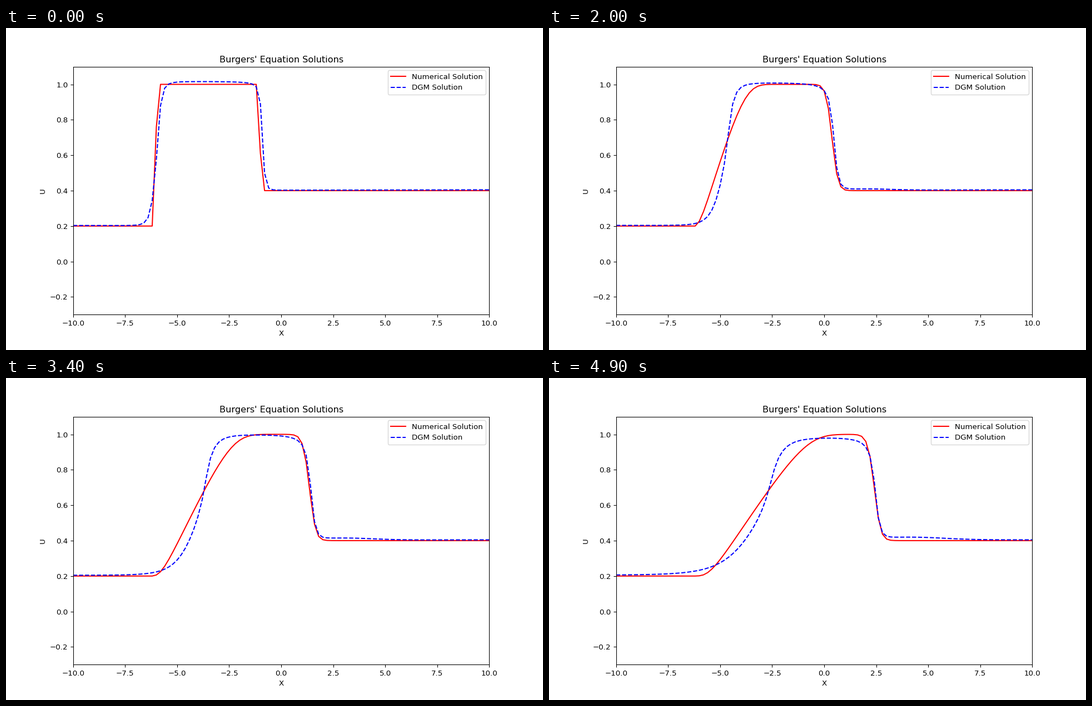
Write a matplotlib script that moves like this. It is 966 px wide and 580 px high and loops after 5 s.

```python
import numpy as np
import matplotlib.pyplot as plt
from matplotlib.animation import FuncAnimation

FRAMES, INTERVAL = 50, 100
DX, DT = 0.2, 0.1
DPI = 96.6
x = np.linspace(-10, 10, 101)


def upwind_history():
    """First-order conservative upwind solution, one row per time step."""
    u = np.select([x < -6.1, x < -1.1], [0.2, 1.0], 0.4)
    history = []
    for _ in range(FRAMES):
        flux = u ** 2 / 2
        u = u.copy()
        u[1:] -= DT / DX * np.diff(flux)
        history.append(u)
    return history


def front(centre, widths, tails):
    """Logistic step from 0 to 1 with its own width and tail on each side."""
    z = np.linspace(-8, 8, 161)
    left, right = widths
    width = (left + right) / 2 + (right - left) / 2 * np.tanh(z)
    tail = np.where(z < 0, *tails)
    offset = width * np.sinh(tail * z) / tail
    return np.interp(x, centre + offset, 1 / (1 + np.exp(-z)))


def network_solution(t):
    # The rising front spreads steadily, mostly towards its foot.
    rise = front(-5.98 + 0.626 * t,
                 widths=(0.14 + 0.04 * t + 0.0225 * t ** 2,
                         0.105 + 0.02 * t + 0.0075 * t ** 2),
                 tails=(0.2, 0.35))

    # The shock soon settles into a fixed, slightly rounded shape.
    shock = -0.92 + 0.685 * t
    fall = front(shock,
                 widths=(0.05 + 0.1 * (1 - np.exp(-t / 1.8)),
                         0.07 + 0.045 * (1 - np.exp(-t))),
                 tails=(0.7, 0.25))

    # A shallow bump grows ahead of the shock.
    spread = 0.7 + 0.2 * t
    bump = 0.0034 * t * np.exp(-((x - shock - 1.6) / spread) ** 2 / 2)

    low = 0.203 + 0.0005 * t
    top = 1.017 - 0.0011 * t ** 2
    ahead = 0.4025 + 0.0002 * x + bump
    return low + (top - low) * rise - (top - ahead) * fall


numerical = upwind_history()

fig, ax = plt.subplots(figsize=(966 / DPI, 580 / DPI), dpi=DPI)
numerical_line, = ax.plot(x, numerical[0], "r-", label="Numerical Solution")
network_line, = ax.plot(x, network_solution(0), "b--", label="DGM Solution")
ax.set(xlim=(-10, 10), ylim=(-0.3, 1.1), xlabel="X", ylabel="U",
       title="Burgers' Equation Solutions")
ax.legend(loc="upper right")


def update(frame):
    numerical_line.set_ydata(numerical[frame])
    network_line.set_ydata(network_solution(frame * DT))
    return numerical_line, network_line


animation = FuncAnimation(fig, update, frames=FRAMES, interval=INTERVAL,
                          repeat=True, repeat_delay=0)
plt.show()
```
